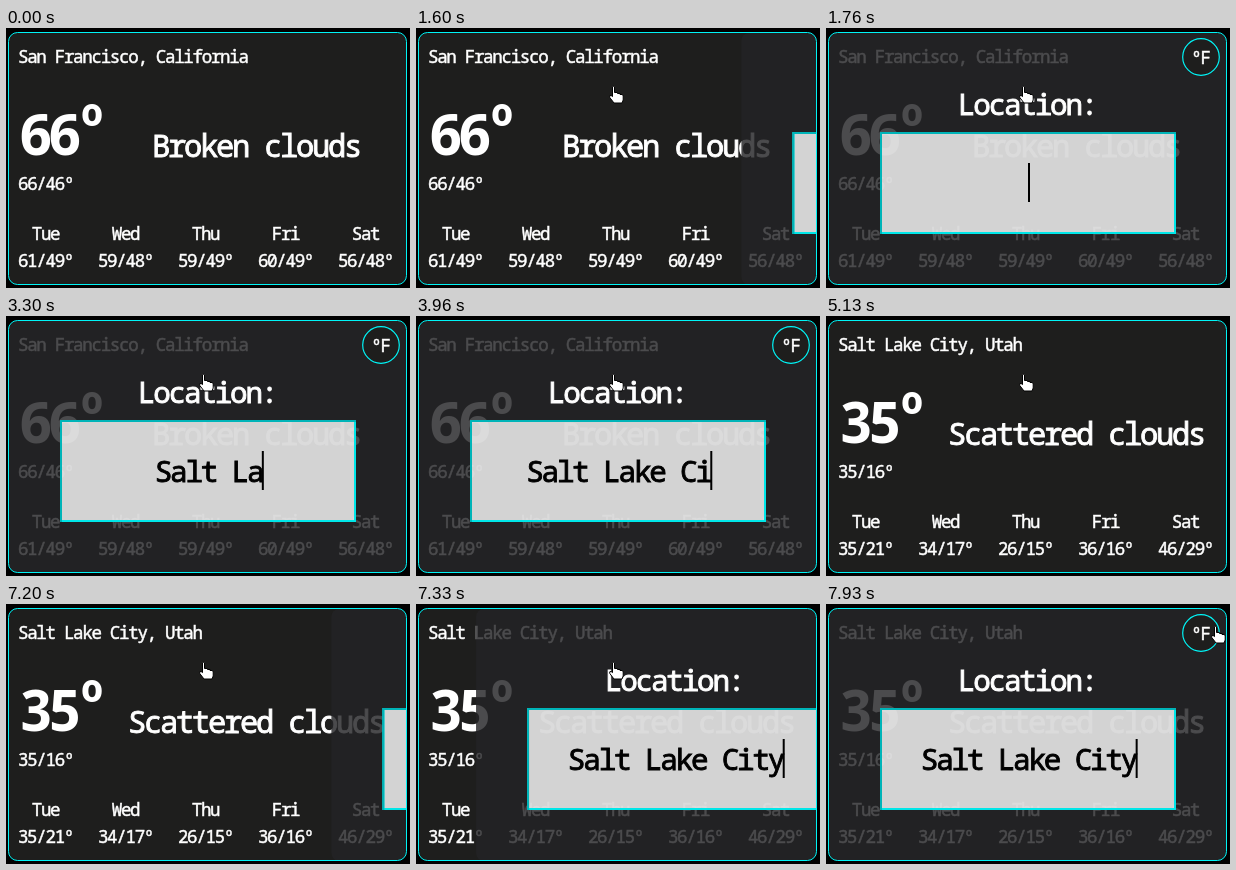
Animation, 404 px wide and 260 px high, one loop 8000 ms. Source, as an HTML page:

```html
<!DOCTYPE html>
<html lang="en">
<meta charset="utf-8">
<title>Weather card</title>
<style>
  html, body { margin: 0; width: 100%; height: 100%; overflow: hidden; background: #000; }
  svg { display: block; }
  text {
    font: 17.5px "Noto Sans Mono", "DejaVu Sans Mono", monospace;
    letter-spacing: -.075em; white-space: pre;
    fill: #fff; stroke: #fff; stroke-width: .5;
  }
  .mid { text-anchor: middle; }
  #temp { font-size: 58px; font-weight: 700; letter-spacing: -.1em; stroke: none; }
  #sky, .field { stroke-width: .9; }
  #sky { font-size: 30.5px; }
  .field { font-size: 29.3px; }
  #typed { fill: #000; stroke: #000; }
</style>
<svg width="404" height="260" viewBox="0 0 404 260">
  <clipPath id="inside"><rect x="2.5" y="4.5" width="398" height="252" rx="9"/></clipPath>
  <rect x="2.5" y="4.5" width="398" height="252" rx="9" fill="#1e1e1d"/>
  <text id="place" x="12" y="35"></text>
  <text x="12.5" y="127" id="temp"><tspan id="degrees"></tspan><tspan dx="-3" dy="-6" font-size="62">º</tspan></text>
  <text id="sky" class="mid" x="250" y="129"></text>
  <text id="range" x="12" y="161.5"></text>
  <g id="forecast"></g>
  <g clip-path="url(#inside)">
    <g id="panel">
      <rect x="3" y="5" width="398" height="252" rx="8" fill="#242426" fill-opacity=".82"/>
      <text class="mid field" x="201" y="87">Location:</text>
      <circle cx="375" cy="29" r="18.3" fill="#1e1e1d" stroke="#00f4f6" stroke-width="1.2"/>
      <text class="mid" x="374.5" y="36">ºF</text>
      <rect x="55" y="105" width="294" height="100" fill="#fff" fill-opacity=".8" stroke="#00e6e8" stroke-width="2"/>
      <path d="M55 206V105H350" fill="none" stroke="#00b4b8" stroke-width="2"/>
      <text id="typed" class="field" y="166"></text>
      <rect id="caret" y="135" width="2" height="39"/>
    </g>
  </g>
  <rect x="2.5" y="4.5" width="398" height="252" rx="9" fill="none" stroke="#00f4f6"/>
  <path id="hand" fill="#fff" stroke="#000" stroke-linejoin="round"
    d="M3.5 1Q4.5-.3 5.5 1V6.5H8.5V7.5H11V8.5H13.5L14.2 10V14L13 17H5L.8 11.5Q0 9.2 2 9.4L3.5 10.6Z"/>
</svg>
<script>
const LOOP = 8000, TICK = 1000 / 30, SLIDE = 200, WIDTH = 398;
const QUERY = "Salt Lake City", CENTER = 202.5, ADVANCE = 15.38;
const KEY_TIMES = [2230, 2430, 2600, 2760, 2960, 3130, 3300, 3400, 3500, 3630, 3800, 3960, 4130, 4200];
const DAYS = ["Tue", "Wed", "Thu", "Fri", "Sat"];
const CITIES = [
  { place: "San Francisco, California", temp: 66, sky: "Broken clouds", range: "66/46",
    days: ["61/49", "59/48", "59/49", "60/49", "56/48"] },
  { place: "Salt Lake City, Utah", temp: 35, sky: "Scattered clouds", range: "35/16",
    days: ["35/21", "34/17", "26/15", "36/16", "46/29"] },
];

const $ = id => document.getElementById(id);
const progress = (t, start, length) => Math.min(1, Math.max(0, (t - start) / length));
const smooth = p => (1 - Math.cos(Math.PI * p)) / 2;
const mix = (a, b, p) => a + (b - a) * p;

$("forecast").innerHTML = DAYS.map((day, i) => {
  const x = 39.5 + 80 * i;
  return `<text class="mid" x="${x}" y="212">${day}</text><text class="mid" x="${x}" y="238.5"></text>`;
}).join("");
const dayRanges = document.querySelectorAll("#forecast text:nth-child(even)");

function drawWeather(t) {
  const now = CITIES[+(t >= 4960)], later = CITIES[+(t >= 5130)];
  $("degrees").textContent = now.temp;
  $("sky").textContent = now.sky;
  $("range").textContent = now.range + "º";
  $("place").textContent = later.place;
  dayRanges.forEach((node, i) => node.textContent = later.days[i] + "º");
}

function drawPanel(t) {
  const shown = progress(t, 1562, SLIDE) - progress(t, 4433, SLIDE) + progress(t, 7162, SLIDE);
  $("panel").setAttribute("transform", `translate(${WIDTH * (1 - shown)} 0)`);
  const count = KEY_TIMES.filter(k => t >= k).length, half = count * ADVANCE / 2;
  $("typed").textContent = QUERY.slice(0, count);
  $("typed").setAttribute("x", CENTER - half);
  $("caret").setAttribute("x", CENTER - .5 + half);
}

function drawHand(t) {
  const enter = smooth(progress(t, 890, 210)), leave = smooth(progress(t, 7400, 520));
  const x = mix(mix(371, 193, enter), 385, leave);
  const y = mix(mix(74, 58, enter), 22, leave);
  $("hand").setAttribute("transform", `translate(${x} ${y})`);
  $("hand").style.display = t < 900 ? "none" : "";
}

function frame(now) {
  // Hold each picture for a thirtieth of a second; 7 ms absorbs rounded times.
  const t = Math.floor((now % LOOP + 7) / TICK) * TICK;
  drawWeather(t);
  drawPanel(t);
  drawHand(t);
  requestAnimationFrame(frame);
}
frame(0);
</script>
</html>
```
